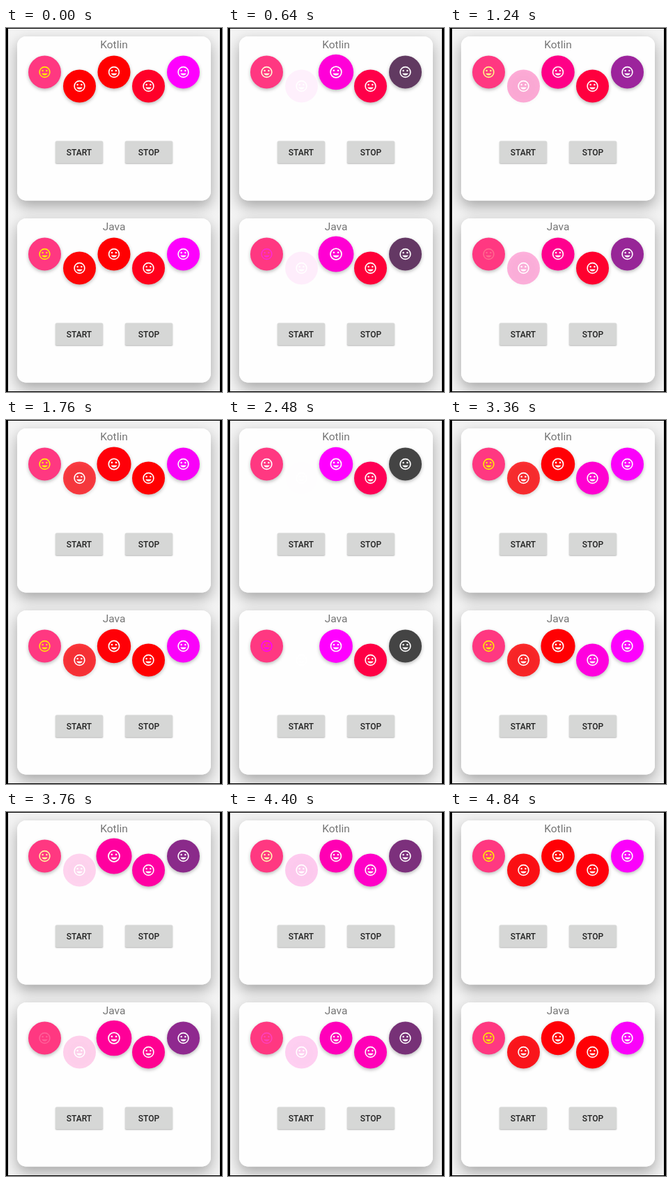
An HTML page with a canvas for the animation above (4880 ms loop, 310x520 px).

```html
<!DOCTYPE html>
<html lang="en">
<head>
<meta charset="utf-8">
<title>Button animations</title>
<style>
  html, body { margin: 0; width: 100%; height: 100%; overflow: hidden; background: #000; }
  canvas { display: block; }
</style>
</head>
<body>
<canvas id="stage" width="310" height="520"></canvas>
<script>
const ctx = document.getElementById('stage').getContext('2d');
const LOOP = 4880, STEP = 40, RADIUS = 23.5;
const RED = [255, 0, 0], MAGENTA = [255, 0, 255], PINK = [255, 56, 129];
const YELLOW = [255, 235, 0], WHITE = [255, 255, 255], CHARCOAL = [68, 68, 68];
const mouth = new Path2D('M12 17.5c2.33 0 4.31-1.46 5.11-3.5H6.89c.8 2.04 2.78 3.5 5.11 3.5z');

const cards = [
  { title: 'Kotlin', y: 12, lag: 0, iconEnd: WHITE },
  { title: 'Java', y: 272, lag: 14, iconEnd: MAGENTA }
];

const mix = (a, b, p) => `rgb(${a.map((v, i) => Math.round(v + (b[i] - v) * p))})`;
// Eased back-and-forth progress, 0 to 1 and back within one period.
const swing = (t, period) => (1 - Math.cos(2 * Math.PI * t / period)) / 2;

function setShadow(alpha, blur, dy) {
  ctx.shadowColor = `rgba(0,0,0,${alpha})`;
  ctx.shadowBlur = blur;
  ctx.shadowOffsetY = dy;
}

function box(x, y, w, h, r, color) {
  ctx.fillStyle = color;
  ctx.beginPath();
  ctx.roundRect(x, y, w, h, r);
  ctx.fill();
}

function label(text, x, y, font, color) {
  ctx.font = font;
  ctx.fillStyle = color;
  ctx.textAlign = 'center';
  ctx.fillText(text, x, y);
}

function disc(x, y, r) {
  ctx.beginPath();
  ctx.arc(x, y, r, 0, 2 * Math.PI);
  ctx.fill();
}

function smiley(color) {
  ctx.scale(0.82, 0.82);
  ctx.translate(-12, -12);
  ctx.fillStyle = ctx.strokeStyle = color;
  ctx.lineWidth = 2;
  ctx.beginPath();
  ctx.arc(12, 12, 9, 0, 2 * Math.PI);
  ctx.stroke();
  disc(8.5, 9.5, 1.5);
  disc(15.5, 9.5, 1.5);
  ctx.fill(mouth);
}

function roundButton(x, y, color, { icon = '#fff', scale = 1, alpha = 1 } = {}) {
  ctx.save();
  ctx.translate(x, y);
  ctx.scale(scale, scale);
  ctx.save();
  ctx.globalAlpha = alpha;
  setShadow(0.27 * alpha, 5, 2);
  ctx.fillStyle = color;
  disc(0, 0, RADIUS);
  ctx.restore();
  smiley(icon);
  ctx.restore();
}

function textButton(text, x, y) {
  ctx.save();
  setShadow(0.3, 2, 1);
  box(x, y, 68, 31.5, 1.5, '#d6d7d6');
  ctx.restore();
  label(text, x + 34, y + 20.5, '500 12px Roboto, sans-serif', '#222');
}

function drawCard({ title, y, lag, iconEnd }, time) {
  const t = time - lag;
  const slow = swing(t - 35, LOOP / 3);
  const quick = swing(t + 80, LOOP / 8);
  const pulse = swing(t + 8, LOOP / 20);
  const fade = Math.abs(Math.sin(3 * Math.PI * t / LOOP));
  const high = y + 51, low = y + 71;

  box(16, y, 278, 234.5, 13, '#fefefe');
  label(title, 155, y + 17, '15.5px Roboto, sans-serif', '#757575');
  roundButton(55.5, high, mix(PINK, PINK, 0), { icon: mix(YELLOW, iconEnd, slow) });
  roundButton(105.5, low, mix(RED, MAGENTA, slow), { alpha: 1 - fade });
  roundButton(155, high, mix(RED, MAGENTA, slow), { scale: 1 + 0.09 * pulse });
  roundButton(204.5, low, mix(RED, MAGENTA, quick));
  roundButton(254.5, high, mix(MAGENTA, CHARCOAL, slow));
  textButton('START', 71, y + 149.5);
  textButton('STOP', 171, y + 149.5);
}

function draw(time) {
  ctx.fillStyle = '#000';
  ctx.fillRect(0, 0, 310, 520);
  ctx.save();
  ctx.beginPath();
  ctx.rect(3, 1, 304, 518);
  ctx.clip();
  ctx.fillStyle = '#f3f3f3';
  ctx.fillRect(3, 1, 304, 518);
  for (const { y } of cards) {
    ctx.save();
    setShadow(0.32, 20, 8);
    box(16, y, 278, 234.5, 13, '#fefefe');
    ctx.restore();
  }
  cards.forEach(card => drawCard(card, time));
  ctx.restore();
}

const start = performance.now();
function tick() {
  const elapsed = (performance.now() - start) % LOOP;
  draw(Math.floor(elapsed / STEP) * STEP);
  requestAnimationFrame(tick);
}
tick();
</script>
</body>
</html>
```
